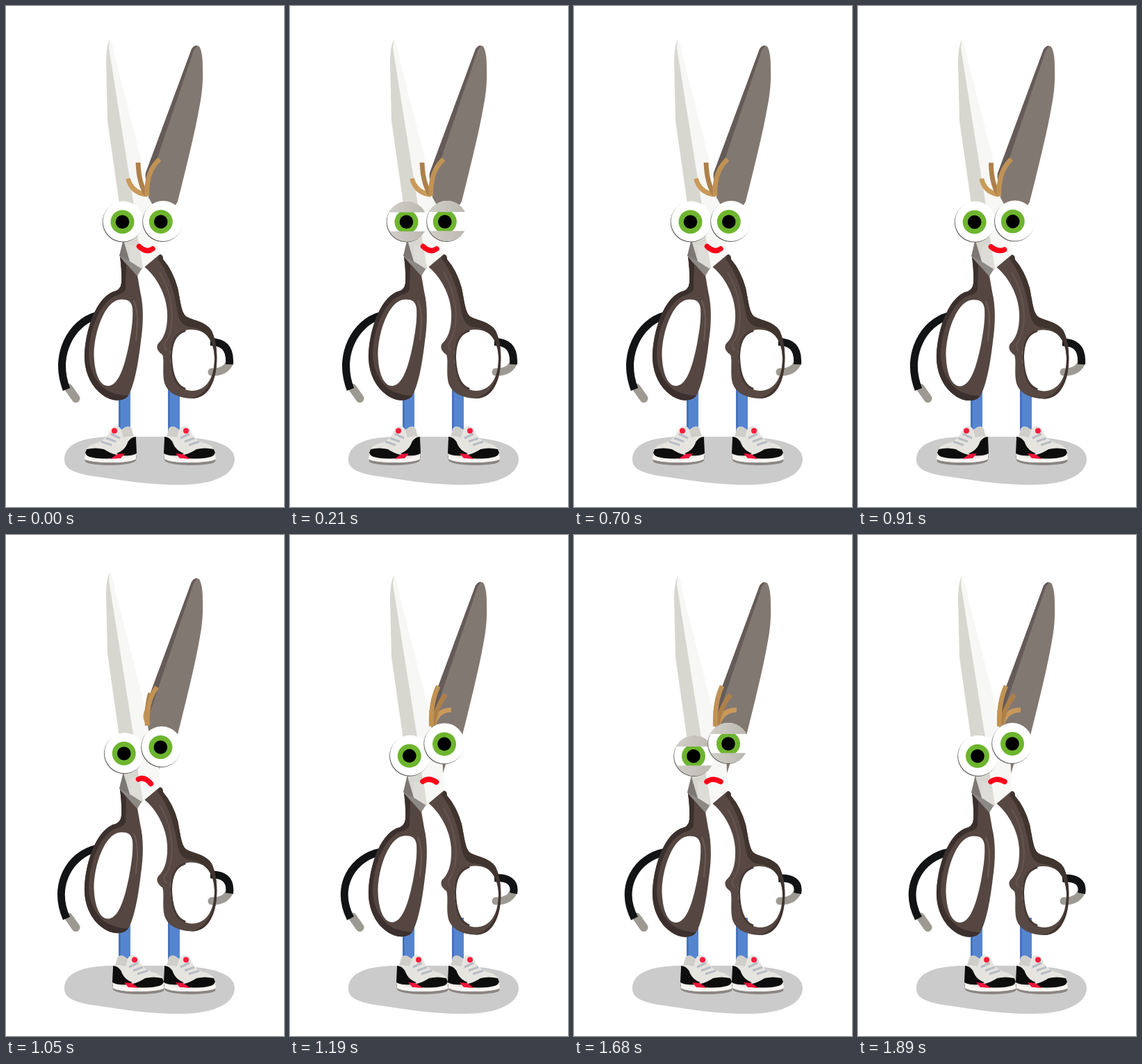
Recreate the animation shown at these times as an HTML page. Size 400 px wide and 720 px high, loop 2100 ms.

```html
<!DOCTYPE html>
<html lang="en">
<head>
<meta charset="utf-8">
<title>Scissors</title>
<style>
  html, body { margin: 0; width: 100%; height: 100%; overflow: hidden; background: #fff; }
  svg { display: block; width: 100vw; height: 100vh; }
  .line { fill: none; stroke-linecap: round; }
  .strand { fill: none; stroke-width: 6.8; }
</style>
</head>
<body>
<svg viewBox="0 0 400 720">
  <defs>
    <linearGradient id="lidTone">
      <stop offset="0" stop-color="#d2d0c9"/><stop offset="1" stop-color="#b9b7ae"/>
    </linearGradient>
    <clipPath id="eyeClip"><circle r="29"/></clipPath>

    <g id="shoe">
      <path fill="#8b8684" d="M227 646L228 653Q232 659 262 660Q294 660 301 655L302 648Z"/>
      <path fill="#e6e4df" d="M227 621Q232 618 234 608Q236 603 243 605L249 609Q252 603 259 604Q265 607 267 614Q273 624 284 628Q299 631 301 641L302 651Q294 656 262 656Q237 656 228 651Z"/>
      <path fill="#d0cec9" d="M234 608Q236 603 243 605L249 610L246 620Q238 618 232 618Z"/>
      <path fill="#0d0d0d" d="M228 619Q238 620 241 630Q245 639 256 643L247 646Q235 647 227 643Z"/>
      <path fill="#0d0d0d" d="M256 645Q267 642 274 637Q286 634 299 637L301 642Q299 648 289 650Q276 651 262 650Z"/>
      <path fill="#f0133a" d="M244 643L255 644L265 651L250 650Z"/>
      <path fill="#f6f5f2" d="M228 645Q245 651 267 651Q288 651 301 646L302 651Q294 656 262 656Q237 656 228 651Z"/>
      <path fill="none" stroke="#b8bdc5" stroke-width="3.2" d="M251 621L264 615M257 626L271 621M263 631L278 626"/>
      <circle cx="259" cy="610.500" r="4" fill="#fa1b3c"/>
    </g>

    <g id="eye">
      <circle cx="-.8" cy="1" r="29" fill="#5e5a58"/>
      <circle r="29" fill="#fff"/>
    </g>
    <g id="iris">
      <circle r="17" fill="#6eb52f"/>
      <circle r="9.800" fill="#000"/>
    </g>
  </defs>

  <path fill="#cbcbcb" d="M84 652C84 632 104 620 150 619L230 619C285 619 329 627 329 651C329 674 297 689 247 688C200 688 165 681 128 676C100 672 84 666 84 652Z"/>

  <g fill="#5685cf">
    <path d="M162 553H179V612H162Z M233 550H250V612H233Z"/>
    <path fill="#4673b9" d="M162 553H165V612H162Z M233 550H236V612H233Z"/>
  </g>
  <use id="leftShoe" href="#shoe"/>
  <use href="#shoe"/>

  <g class="line" stroke-width="11">
    <path stroke="#9c9a92" stroke-width="12" d="M90 549L100.500 564"/>
    <path id="leftArm" stroke="#121314" stroke-linecap="butt"/>
    <path stroke="#9c9a92" d="M321 514Q314 527 296 526"/>
    <path id="rightArm" stroke="#121314" stroke-linecap="butt"/>
  </g>

  <g id="body">
    <path fill="#827872" d="M267 62Q272 55 278 58Q283 66 283 88C284 114 281 132 277 152Q271 186 247 281L224 319L219 335L195 330L201 240Z"/>
    <path fill="#655b58" d="M267 62Q271 56 275 57L270 64L208 247L199 265L201 240Z"/>

    <path fill="#574843" fill-rule="evenodd" d="M197 373L221 357Q226 357 226 364Q240 380 247 405C251 424 252 440 259 446C268 452 288 453 296 467C303 482 304 500 303 515C301 543 289 565 266 564C242 563 229 552 227 537C225 523 228 508 225 501C219 497 215 491 219 485C228 477 233 462 232 440C231 417 218 389 197 373Z
      M266 465C245 466 237 482 236 503C237 533 246 552 267 553C291 553 300 530 300 506C300 480 288 465 266 465Z"/>
    <path fill="#40342f" d="M221 357Q226 357 226 364Q240 380 247 405C251 424 252 440 259 446C268 452 288 453 296 467C303 482 304 500 303 515C301 543 289 565 266 564C292 558 300 533 300 506C300 484 288 464 267 462C255 461 249 453 247 440C242 408 233 382 218 363Z"/>
    <path class="line" stroke="#463934" stroke-width="3" d="M257 467C243 471 238 486 237.500 503C238 528 244 545 257 550"/>
    <path class="line" stroke="#6a5953" stroke-width="1.500" d="M221 383Q236 406 239 442Q239 468 231 481Q224 487 231 495"/>

    <path fill="#554641" fill-rule="evenodd" d="M164 360L189 387Q191 398 193 410C198 430 198 455 194 482C190 517 184 546 176 560C168 570 151 568 139 559C122 547 112 525 113 500C115 464 129 422 153 411Q165 409 166 398Q167 384 164 360Z
      M163 422C142 425 127 468 126.500 500C127 526 134 546 147 546C163 545 171 515 177 486C181 464 183 450 182 434C180 423 174 421 163 422Z"/>
    <path fill="#3b302d" d="M164 360L173 372L172 407Q170 413 159 416C135 425 120 465 119 500C119 526 134 549 151 555Q163 560 176 560C168 570 151 568 139 559C122 547 112 525 113 500C115 464 129 422 153 411Q165 409 166 398Q167 384 164 360Z"/>
    <path class="line" stroke="#6c5b55" stroke-width="2" d="M184 424Q190 438 189 458Q188 468 187 480"/>

    <path fill="#7c7774" d="M170 330L163 359L188 387L196 377L184 350Z"/>
    <path fill="#d8d7cf" d="M149 48Q144 60 144 82L146 165L163 284L170 340L178 367L195 378L202 345L190 280L152 54Z"/>
    <path fill="#f7f7f5" d="M149 48Q155 56 157 74L200 242L205 275L219 300L221 357L196 378L192 350L184 286L148 60Z"/>
    <path fill="#dddcd6" d="M178 344L192 344L197 377L178 367Z"/>
    <path fill="#8d8984" d="M163 359L178 367L195 378L189 388Z"/>
  </g>

  <path id="hair0" class="strand" stroke="#c99a5a"/>
  <path id="hair1" class="strand" stroke="#ad804a"/>
  <path id="hair2" class="strand" stroke="#c09254"/>

  <g id="leftEye">
    <use href="#eye"/><use href="#iris" x="-1" y=".7"/>
    <g class="lids" clip-path="url(#eyeClip)" fill="url(#lidTone)"><rect x="-30" y="-30" width="60"/><rect x="-30" width="60" height="60"/></g>
  </g>
  <g id="rightEye">
    <use href="#eye"/><use id="rightIris" href="#iris" y="1"/>
    <g class="lids" clip-path="url(#eyeClip)" fill="url(#lidTone)"><rect x="-30" y="-30" width="60"/><rect x="-30" width="60" height="60"/></g>
  </g>
  <path id="mouth" class="line" stroke="#fb0019" stroke-width="7.500"/>
</svg>

<script>
const LOOP = 2100, STEP = 70;
const $ = id => document.getElementById(id);
const set = (id, name, value) => $(id).setAttribute(name, value);
const lerp = (a, b, p) => a + (b - a) * p;
const mix = (a, b, p) => a.map((v, i) => lerp(v, b[i], p));
const quad = ([x, y, cx, cy, ex, ey]) => `M${x} ${y}Q${cx} ${cy} ${ex} ${ey}`;
const cubic = ([x, y, ...rest]) => `M${x} ${y}C${rest}`;
const clamp = v => Math.min(1, Math.max(0, v));
const quintInOut = u => u < .5 ? 16 * u ** 5 : 1 - 16 * (1 - u) ** 5;

// Each limb or strand: happy curve, sad curve.
const arms = {
  leftArm: [[130, 445, 95, 455, 68, 500, 87, 551], [130, 456, 92, 463, 63, 504, 87, 551]],
  rightArm: [[294, 482.5, 312, 483, 323, 490, 321.5, 515], [294, 493.5, 312, 492, 325, 498, 321.5, 515]]
};
const hair = [
  [[175.5, 248, 181, 269, 203, 271], [234, 251.5, 213, 251, 207, 273]],
  [[190, 225, 191, 255, 202, 271], [225.5, 229.5, 211, 246, 206, 273]],
  [[221, 220, 201, 238, 203, 273], [213, 217, 202, 240, 203.5, 275]]
];
const smile = [191.5, 345.5, 202, 355.5, 211, 349];
const wince = [190.5, 351, 199, 346.5, 208.5, 357.5];
const frown = [191, 354.5, 200, 348, 211, 354.5];

// Passes through wince halfway from smile to frown.
const mouthAt = p => smile.map((s, i) =>
  s * (1 - p) * (1 - 2 * p) + wince[i] * 4 * p * (1 - p) + frown[i] * p * (2 * p - 1));

// Closes in three steps, opens in two.
function blink(t, start) {
  const u = t - start;
  if (u <= 0 || u >= 350) return 0;
  return u <= 210 ? (u / 210) ** 1.55 : (350 - u) / 140;
}

function draw(time) {
  const t = Math.floor((time % LOOP) / STEP + 1e-4) * STEP;
  const p = quintInOut(clamp((t - 700) / 700));

  set('body', 'transform', `translate(0 ${11 * p})`);
  set('leftShoe', 'transform', t < 1050 ? 'translate(415 0) scale(-1 1)' : 'translate(-74 0)');
  for (const id in arms) set(id, 'd', cubic(mix(...arms[id], p)));
  hair.forEach((pair, i) => set('hair' + i, 'd', quad(mix(...pair, p))));
  set('mouth', 'd', quad(mouthAt(p)));

  set('leftEye', 'transform', `translate(${mix([168.5, 309.5], [173, 317], p)})`);
  set('rightEye', 'transform', `translate(${mix([226, 309], [222, 299], p)})`);
  set('rightIris', 'x', lerp(-3.2, 0, p));

  const shut = Math.max(blink(t, 70), blink(t, 1540));
  document.querySelectorAll('.lids').forEach(lids => {
    const [upper, lower] = lids.children;
    lids.setAttribute('visibility', shut ? 'visible' : 'hidden');
    upper.setAttribute('height', 1 + 30 * shut);
    lower.setAttribute('y', 29 - 27.5 * shut);
  });
}

const begin = performance.now();
function tick() {
  draw(performance.now() - begin);
  requestAnimationFrame(tick);
}
draw(0);
requestAnimationFrame(tick);
</script>
</body>
</html>
```
